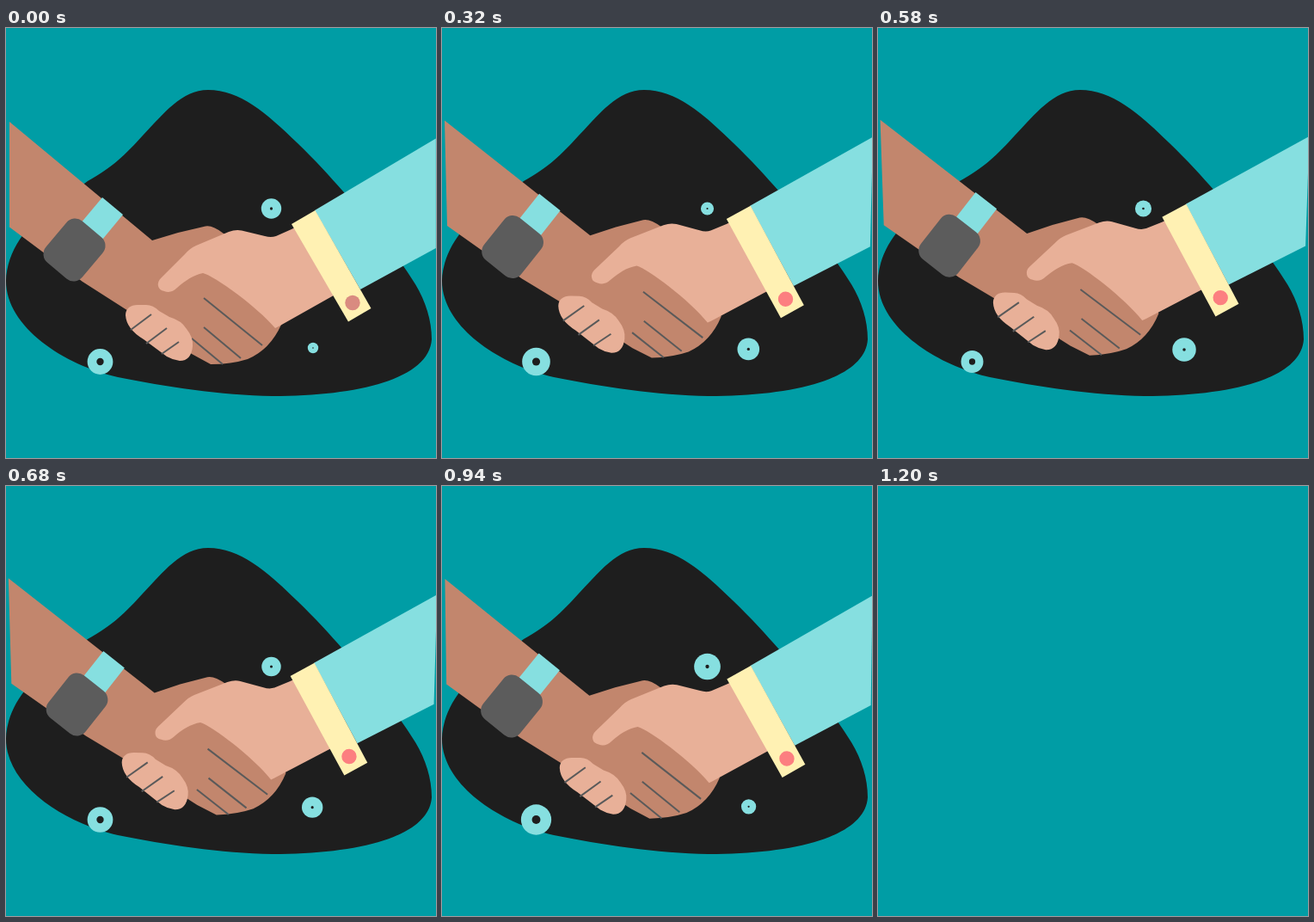
An HTML page that plays this animation: 500 by 500 pixels, repeating every 1.22 s.

```html
<!DOCTYPE html>
<html lang="en">
<head>
<meta charset="utf-8">
<title>Handshake</title>
<style>
  html, body { margin: 0; width: 100%; height: 100%; overflow: hidden; background: #009da5; }
  svg { display: block; width: 100vw; height: 100vh; }
  .ink { fill: #1e1e1e; }
  .aqua { fill: #86dfe0; }
  .tan { fill: #c2866d; }
  .peach { fill: #e8b098; }
  .line { fill: none; stroke: #5a5a5a; stroke-width: 2; }
</style>
</head>
<body>
<svg viewBox="0 0 500 500">
  <g id="scene">
    <path class="ink" d="M235 72C272 72 303 99 338 133C360 154 377 173 392 190C424 224 452 260 476 298C488 318 495 340 495 362C492 408 410 428 310 428C250 427 185 417 130 406C68 392 0 348 0 294C1 260 23 229 58 203C75 191 83 187 95 178C124 162 139 147 159 125C183 100 204 72 235 72Z"/>

    <g id="rings"></g>

    <g id="left">
      <path class="tan" d="M4 109L170 247L200 238L232 230.500Q240 229 253 239L300 270L320 345Q307 374 281 385Q262 391 238 391L216 379L150 334L89 295L4 231.500Z"/>
      <path class="aqua" d="M112 197L136 217L112 246L86 228Z"/>
      <rect x="-27.500" y="-31.500" width="55" height="63" rx="13" fill="#5c5c5c" transform="translate(79.500 258) rotate(40)"/>
      <path class="line" d="M230 314L298 369M230 348L273 384M216 361L252 391"/>
    </g>

    <g id="right">
      <path class="peach" d="M139 334C139 326 145 322 153 322L163 322Q171 322 178 329L190 336Q204 340 210 350Q218 360 217 370C216 381 211 387 202 387Q194 386 187 382L160 362Q140 350 139 334Z"/>
      <path class="line" d="M169 333L145 351M187 349L163 367M201 365L181 379"/>
      <path class="peach" d="M340 230L332 234L314 242Q308 244 301 242L274 235.500Q267 234 259 237L221 253Q214 256 208 263L180 291Q176 295 177 300Q178 305 184 306Q192 309 199 302C208 294 218 287 229 285C242 288 292 324 313 349L317 347L388 307Z"/>
      <path class="aqua" d="M359 212L499.800 128.500L499.800 256L412 304Z"/>
      <path fill="#fff1b3" d="M332 228L359.500 212L424.500 326L398 341.500Z"/>
      <circle id="button" cx="403" cy="319.500" r="8.700"/>
    </g>
  </g>
</svg>
<script>
const LOOP = 1220, STEP = 20, BLANK_AT = 1200;
const $ = id => document.getElementById(id);

// Rises evenly from 0 to 1 at the peak, then falls back by the end.
function pulse(t, peak, end, power = 1) {
  return t < peak ? t / peak : Math.max(0, (end - t) / (end - peak)) ** power;
}

const wave = (t, shift, cycles) => Math.cos(2 * Math.PI * cycles * (t - shift) / LOOP);

const rings = [
  { x: 308.5, y: 210, dot: .14, size: t => 6.5 + 9 * pulse((t + LOOP - 400) % LOOP, 530, LOOP) },
  { x: 109.5, y: 388, dot: .28, size: t => 15.7 + wave(t, -140, 1) + 2 * wave(t, 240, 2) },
  { x: 357, y: 372, dx: -1, dy: 2, dot: .13, size: t => 6.2 + 9.5 * pulse(t, 460, BLANK_AT, 1.3) }
];

function addCircle(name) {
  const c = document.createElementNS("http://www.w3.org/2000/svg", "circle");
  c.setAttribute("class", name);
  return $("rings").appendChild(c);
}
for (const r of rings) r.parts = [addCircle("aqua"), addCircle("ink")];

function draw(t) {
  $("scene").style.display = t >= BLANK_AT ? "none" : "";
  const lift = 1.1 * pulse(t, 500, BLANK_AT);
  $("left").setAttribute("transform", `rotate(${-2 * lift} -60 150)`);
  $("right").setAttribute("transform", `rotate(${2 * lift} 574 176)`);
  $("button").setAttribute("fill", t < STEP ? "#d98b80" : "#fc7f80");
  for (const { x, y, dx = 0, dy = 0, dot, size, parts } of rings) {
    const r = size(t);
    parts.forEach((c, i) => {
      c.setAttribute("cx", x + dx * lift);
      c.setAttribute("cy", y + dy * lift);
      c.setAttribute("r", i ? r * dot : r);
    });
  }
}

const start = performance.now();
function tick() {
  const t = (performance.now() - start) % LOOP;
  draw(Math.floor(t / STEP) * STEP);
  requestAnimationFrame(tick);
}
draw(0);
requestAnimationFrame(tick);
</script>
</body>
</html>
```
